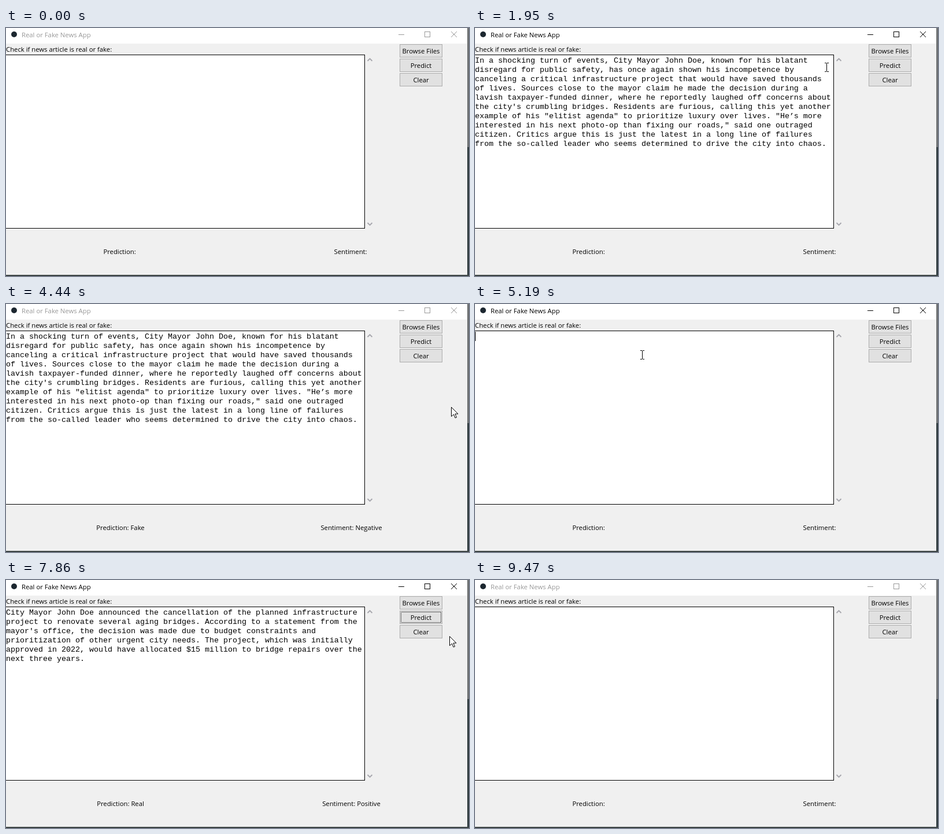
An HTML page with a canvas that plays this animation: 801x429 px, repeating every 9540 ms.

```html
<!DOCTYPE html>
<html lang="en">
<head>
<meta charset="utf-8">
<title>News checker</title>
<style>
  html, body { margin: 0; width: 100%; height: 100%; overflow: hidden; background: #f0f0f0; }
  canvas { display: block; width: 801px; height: 429px; }
</style>
</head>
<body>
<canvas id="stage" width="801" height="429"></canvas>
<script>
const LOOP = 9540;
const STEP = 69; // the pointer is sampled at this interval
const PRESS = 70; // how long a button stays down
const UI = '11.3px "Open Sans", "Noto Sans", sans-serif';
const MONO = '13.333px "Liberation Mono", "Courier New", monospace';
const ctx = document.getElementById('stage').getContext('2d');

const harsh = {
  verdict: ['Fake', 'Negative'],
  lines: [
    'In a shocking turn of events, City Mayor John Doe, known for his blatant',
    'disregard for public safety, has once again shown his incompetence by',
    'canceling a critical infrastructure project that would have saved thousands',
    'of lives. Sources close to the mayor claim he made the decision during a',
    'lavish taxpayer-funded dinner, where he reportedly laughed off concerns about',
    "the city's crumbling bridges. Residents are furious, calling this yet another",
    'example of his "elitist agenda" to prioritize luxury over lives. "He’s more',
    'interested in his next photo-op than fixing our roads," said one outraged',
    'citizen. Critics argue this is just the latest in a long line of failures',
    'from the so-called leader who seems determined to drive the city into chaos.'
  ]
};
const calm = {
  verdict: ['Real', 'Positive'],
  lines: [
    'City Mayor John Doe announced the cancellation of the planned infrastructure',
    'project to renovate several aging bridges. According to a statement from the',
    "mayor's office, the decision was made due to budget constraints and",
    'prioritization of other urgent city needs. The project, which was initially',
    'approved in 2022, would have allocated $15 million to bridge repairs over the',
    'next three years.'
  ]
};
const blank = { verdict: ['', ''], lines: [''] };

// What the user does, and when
const actions = [
  [950, 'Text'], [1340, 'Paste', harsh], [2710, 'Predict'], [4370, 'Leave'],
  [4650, 'Clear'], [5130, 'Text'], [5520, 'Paste', calm], [6750, 'Predict'],
  [8200, 'Clear'], [9470, 'Leave']
];

const buttons = ['Browse Files', 'Predict', 'Clear'];
const buttonTop = i => 28 + 25 * i;

const edge = { x: 770, y: 178, off: true };
const exit = { x: 769, y: 56, off: true };
const below = { x: 742, y: 316, off: true };
const editor = { x: 261, y: 81 };
const line2 = { x: 289, y: 88 };
const predict = { x: 717, y: 56 };
const clear = { x: 722, y: 88 };
const results = { x: 652, y: 390 };
const side = { x: 767, y: 97 };

// Pointer glides: start, end, from, to, sideways bow
const glides = [
  [260, 810, edge, editor, 50],
  [1480, 2290, editor, predict, 8],
  [3110, 3310, predict, exit, 0],
  [4440, 4650, edge, clear, 0],
  [4720, 5060, clear, line2, 0],
  [5780, 6539, line2, predict, 8],
  [6820, 7240, predict, results, 0],
  [7240, 7790, results, side, 70],
  [7880, 8060, side, clear, 0],
  [8670, 8880, clear, below, 0]
];

function stateAt(t) {
  const s = { active: false, focus: '', pressed: '', article: blank, verdict: blank.verdict, blink: 0 };
  for (const [start, name, article] of actions) {
    if (t < start) break;
    s.active = name !== 'Leave';
    if (name === 'Leave') continue;
    if (name === 'Text' || name === 'Paste') s.blink = start;
    if (name === 'Paste') {
      s.article = article;
      continue;
    }
    s.focus = name;
    if (name === 'Text') continue;
    const released = t >= start + PRESS;
    s.pressed = released ? '' : name;
    if (!released) continue;
    if (name === 'Clear') s.article = blank;
    s.verdict = s.article.verdict;
  }
  s.caret = s.active && s.focus === 'Text' && (t - s.blink) % 900 < 600;
  return s;
}

function pointerAt(t) {
  const glide = glides.filter(g => t >= g[0]).pop();
  if (!glide) return null;
  const [start, end, from, to, bow] = glide;
  if (to.off && t >= end) return null;
  const sampled = Math.floor((t - start) / STEP) * STEP;
  const u = Math.min(1, sampled / (end - start));
  const e = 1 - (1 - u) ** 2;
  const dx = to.x - from.x;
  const dy = to.y - from.y;
  const push = 4 * bow * e * (1 - e) / Math.hypot(dx, dy);
  return {
    x: Math.round(from.x + dx * e - dy * push),
    y: Math.round(from.y + dy * e + dx * push)
  };
}

function box(color, x, y, w, h) {
  ctx.fillStyle = color;
  ctx.fillRect(x, y, w, h);
}

function frame(color, x, y, w, h) {
  ctx.strokeStyle = color;
  ctx.lineWidth = 1;
  ctx.strokeRect(x + 0.5, y + 0.5, w - 1, h - 1);
}

function dottedFrame(x, y, w, h) {
  ctx.setLineDash([1, 1]);
  ctx.lineDashOffset = 0.5; // keeps the dots on whole pixels
  frame('#000', x, y, w, h);
  ctx.setLineDash([]);
}

function line(color, width, ...points) {
  ctx.strokeStyle = color;
  ctx.lineWidth = width;
  ctx.beginPath();
  points.forEach(([x, y]) => ctx.lineTo(x, y));
  ctx.stroke();
}

function label(text, x, y, color = '#000', align = 'left', font = UI) {
  ctx.font = font;
  ctx.fillStyle = color;
  ctx.textAlign = align;
  ctx.fillText(text, x, y);
}

function drawWindow(active) {
  const ink = active ? '#000' : '#999';
  box('#f0f0f0', 0, 0, 801, 429);
  box('#fff', 0, 0, 798, 27);
  box('#707375', 798, 0, 3, 206);
  box('#354044', 798, 206, 3, 223);
  box('#3c4444', 0, 427, 801, 2);

  ctx.fillStyle = '#1c2730';
  ctx.beginPath();
  ctx.arc(14, 11, 5, 0, Math.PI * 2);
  ctx.fill();
  label('Real or Fake News App', 27, 16, ink);

  box(ink, 679, 11, 10, 1);
  frame(ink, 724, 6, 10, 10);
  line(ink, 1, [770, 6], [780, 16]);
  line(ink, 1, [780, 6], [770, 16]);
}

function drawChevron(y, dir) {
  line('#a6a6ad', 1.8, [625.5, y - 2 * dir], [629.5, y + 2 * dir], [633.5, y - 2 * dir]);
}

function drawEditor(lines, caret) {
  label('Check if news article is real or fake:', 0, 41);
  box('#000', 0, 46, 621, 301);
  box('#fff', 0, 47, 620, 299);
  lines.forEach((text, i) => label(text, 0, 60 + 16 * i, '#000', 'left', MONO));
  if (caret) {
    const last = lines.length - 1;
    box('#000', lines[last].length * 8 - 1, 48 + 16 * last, 2, 16);
  }
  drawChevron(55, -1);
  drawChevron(339, 1);
}

function drawButton(name, y, hover, pressed, focused) {
  const [fill, rim] = pressed ? ['#cce4f7', '#005499']
    : hover ? ['#e5f1fb', '#0078d7'] : ['#e1e1e1', '#adadad'];
  box(fill, 681, y, 74, 23);
  frame(rim, 681, y, 74, 23);
  label(name, 718, y + 16, '#000', 'center');
  if (focused) dottedFrame(683, y + 2, 70, 19);
}

function drawBeam(x, y) {
  box('#000', x, y - 7, 1, 14);
  for (const row of [y - 8, y + 7]) {
    box('#000', x - 3, row, 3, 1);
    box('#000', x + 1, row, 3, 1);
  }
}

function drawArrow(x, y) {
  const arrow = new Path2D('M.5 .5v16l4-3.5 2.6 6.1 2.4-1-2.6-6h5.1z');
  ctx.save();
  ctx.translate(x, y);
  ctx.fillStyle = '#fff';
  ctx.fill(arrow);
  ctx.strokeStyle = '#000';
  ctx.lineWidth = 1;
  ctx.stroke(arrow);
  ctx.restore();
}

function draw(t) {
  const s = stateAt(t);
  const p = pointerAt(t);

  drawWindow(s.active);
  drawEditor(s.article.lines, s.caret);
  buttons.forEach((name, i) => {
    const y = buttonTop(i);
    const hover = p && p.x >= 681 && p.x < 755 && p.y >= y && p.y < y + 23;
    drawButton(name, y, hover, s.pressed === name, s.active && s.focus === name);
  });
  label('Prediction: ' + s.verdict[0], 198, 391, '#000', 'center');
  label('Sentiment: ' + s.verdict[1], 597.5, 391, '#000', 'center');

  if (!p) return;
  const overText = p.x < 620 && p.y > 46 && p.y < 347;
  (overText ? drawBeam : drawArrow)(p.x, p.y);
}

const began = performance.now();
function tick() {
  draw((performance.now() - began) % LOOP);
  requestAnimationFrame(tick);
}
tick();
</script>
</body>
</html>
```
